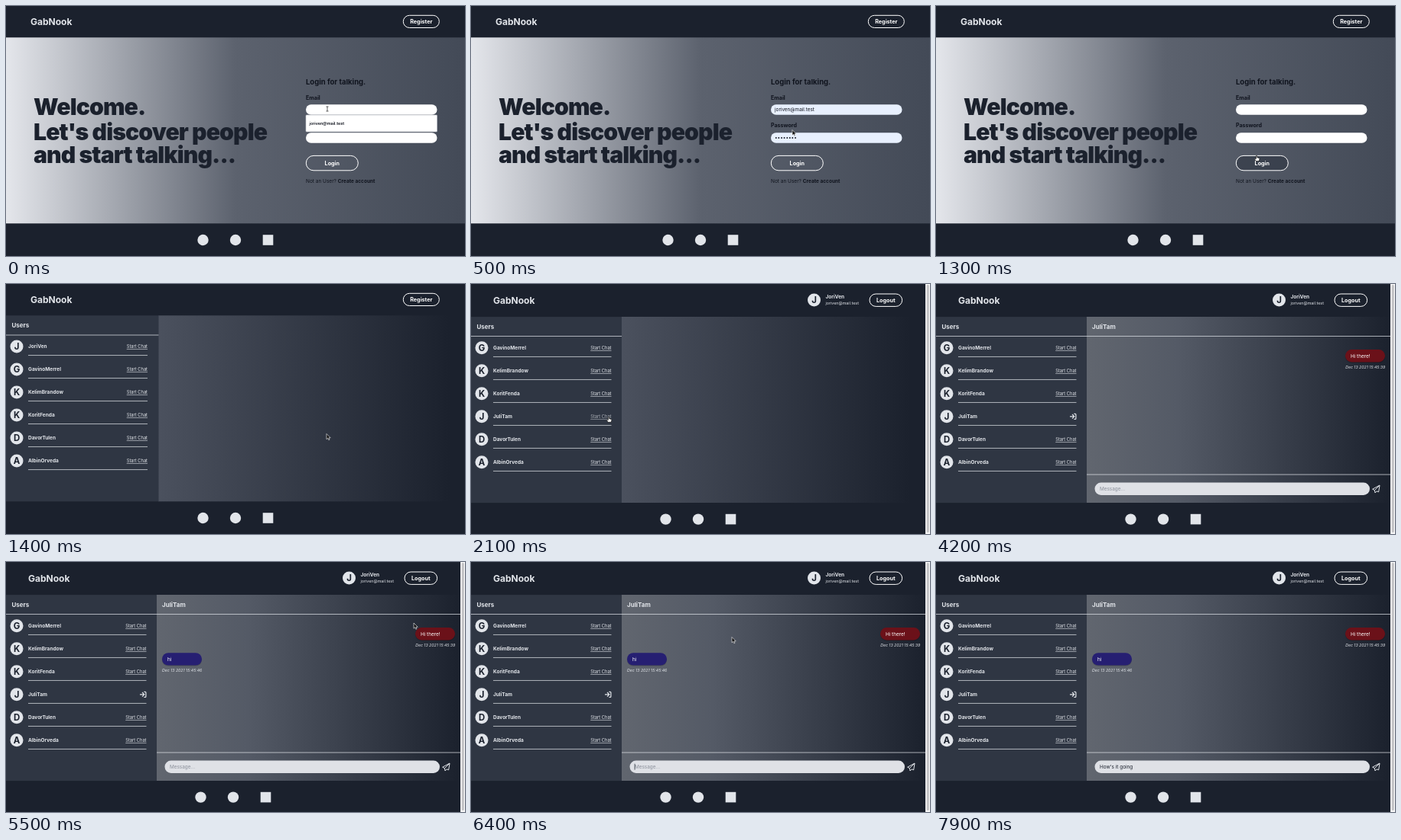
These frames come from a looping animation (600x328 px, 8 s). An HTML page:

```html
<!DOCTYPE html>
<html lang="en">
<head>
<meta charset="utf-8">
<title>Chat demo</title>
<style>
  html, body { margin: 0; width: 100%; height: 100%; overflow: hidden; background: #1b212d; }
  svg { display: block; width: 600px; height: 328px; }
  text { font-family: Inter, "Liberation Sans", sans-serif; white-space: pre; }
  .hero { letter-spacing: -.03em; }
</style>
</head>
<body>
<svg id="stage" viewBox="0 0 600 328" xmlns="http://www.w3.org/2000/svg"></svg>
<script>
const LOOP = 8000, STEP = 100;
const DARK = '#1b212d', INK = '#10141e', LIGHT = '#e2e5ea', PANEL = '#2f3643';
const ME = 'JoriVen', MAIL = 'joriven@mail.test', FRIEND = 'JuliTam';
const OTHERS = ['GavinoMerrel', 'KelimBrandow', 'KoritFenda'];
const LAST = ['DavorTulen', 'AlbinOrveda'];

// Markup helpers
const rect = (x, y, w, h, fill, more = '') =>
  `<rect x="${x}" y="${y}" width="${w}" height="${h}" fill="${fill}" ${more}/>`;
const text = (x, y, str, size, weight = 400, fill = LIGHT, more = '') =>
  `<text x="${x}" y="${y}" font-size="${size}" font-weight="${weight}" fill="${fill}" ${more}>${str}</text>`;
const line = (x1, x2, y) => rect(x1, y - 0.45, x2 - x1, 0.9, LIGHT, 'opacity=".8"');
const group = (id, body) => `<g id="${id}">${body}</g>`;
const END = 'text-anchor="end"', MID = 'text-anchor="middle"';

const pill = (x, y, w, h, fill, more = '') => rect(x, y, w, h, fill, `rx="${h / 2}" ${more}`);
const button = (x, y, w, h, label, fill) =>
  pill(x, y, w, h, fill, 'stroke="#fff"') +
  text(x + w / 2, y + h / 2 + 2.6, label, 7.2, 700, '#fff', MID);
const avatar = (x, y, name) =>
  `<circle cx="${x}" cy="${y}" r="8.5" fill="${LIGHT}"/>` +
  text(x, y + 4.1, name[0], 11.4, 700, DARK, MID);

const gradient = (id, stops) =>
  `<linearGradient id="${id}">${stops.map(([at, c]) =>
    `<stop offset="${at}" stop-color="${c}"/>`).join('')}</linearGradient>`;

const frame = (x, dy) =>
  rect(0, 0, 600, 328, DARK) + text(32 + x, 24.8 + dy / 2, 'GabNook', 12, 700) +
  `<g fill="${LIGHT}"><circle cx="${257.5 + x}" cy="${307 + dy * 0.8}" r="7.2"/>` +
  `<circle cx="${300 + x}" cy="${307 + dy * 0.8}" r="7.2"/></g>` +
  rect(335.7 + x, 300.2 + dy * 0.8, 13.6, 13.6, LIGHT);

const register = button(519.3, 12.3, 47, 16.2, 'Register', DARK);

const startChat = (x, y, more = '') =>
  text(x, y, 'Start Chat', 5.75, 400, LIGHT, `${END} text-decoration="underline" ${more}`);

function userList(names, width, right, dy) {
  const rows = names.map((name, i) => {
    const y = 82 + dy + i * 30;
    return avatar(14, y, name) + text(29, y + 2.3, name, 6.5, 700) +
      (name === FRIEND ? '' : startChat(right, y + 2.2)) + line(29, right, y + 11.6);
  }).join('');
  return rect(0, 41.3 + dy, width, 244, PANEL) + text(7.5, 57 + dy * 0.85, 'Users', 8, 700) +
    line(0, width, 67 + dy * 0.8) + rows;
}

const field = (id, y) => pill(392, y, 171.5, 13.5, '#fff', `id="${id}"`);
const hero = (y, str) => text(36, y, str, 30.2, 900, DARK, 'class="hero"');

const login =
  frame(0, 0) + register + rect(0, 41.3, 600, 244, 'url(#dawn)') +
  hero(143.4, 'Welcome.') + hero(176.4, "Let's discover people") + hero(206.4, 'and start talking...') +
  text(392, 103, 'Login for talking.', 9.5, 700, INK) +
  text(392, 122.5, 'Email', 7.1, 700, INK) + field('emailBox', 129.3) +
  text(392, 159.2, 'Password', 7.1, 700, INK) + field('passBox', 166.2) +
  group('filled', text(397, 138.3, MAIL, 6.4, 400, INK) + text(397, 175.4, '••••••••', 6.4, 400, INK)) +
  pill(392.3, 196.4, 68, 19.4, DARK, 'id="hover" opacity=".4"') +
  button(392.3, 196.4, 68, 19.4, 'Login', 'none') +
  text(392, 232, 'Not an User? <tspan font-weight="700">Create account</tspan>', 6.5, 400, INK) +
  group('suggest', rect(392, 143, 171.5, 22, '#fff', 'rx="1" stroke="#b9bcc4" stroke-width=".6"') +
    text(396.5, 156, MAIL, 5.4, 600, INK));

const lobby =
  frame(0, 0) + register + rect(199, 41.3, 401, 244, 'url(#dusk)') +
  userList([ME, ...OTHERS, ...LAST], 199.5, 185, 0);

const bubble = (x, y, label, fill) =>
  pill(x, y + 1, 52, 16.4, '#000', 'opacity=".22"') + pill(x, y, 52, 16.4, fill) +
  text(x + 7, y + 10.6, label, 6.4, 400, '#fff');
const stamp = (x, y, time, more = '') =>
  text(x, y, 'Dec 13 2021 ' + time, 5.2, 400, LIGHT, `font-style="italic" ${more}`);

const chat =
  rect(197, 43, 397, 244, 'url(#room)') + text(204, 58.6, FRIEND, 8, 700) +
  line(197, 594, 68.5) + line(197, 594, 250) +
  pill(207.5, 260.5, 359.5, 16.4, '#dfe1e6') +
  text(214, 271, '', 6.4, 400, DARK, 'id="draft"') +
  rect(213.7, 264.7, 0.7, 8, DARK, 'id="caret"') +
  `<path d="M580 264 570.6 269.2 573.4 270.6 574 274 576 271.8 578.6 272.8ZM580 264 573.4 270.6" fill="none" stroke="${LIGHT}" stroke-linejoin="round"/>` +
  group('sent', bubble(535, 86, 'Hi there!', '#6b1119') + stamp(587.3, 110.5, '15:45:39', END)) +
  group('reply', bubble(204, 119.2, 'hi', '#261f72') + stamp(204, 144, '15:45:46')) +
  `<path d="M175 173.8h5M178 171l2.8 2.8-2.8 2.8M180.4 170.3h1.6q.9 0 .9.9v5.2q0 .9-.9.9h-1.6" fill="none" stroke="${LIGHT}" stroke-width="1.2"/>`;

const home =
  frame(-3, 2) + avatar(448.5, 21, ME) + text(463.5, 19, ME, 6.5, 700) +
  text(463.5, 27, MAIL, 5.35) + button(521, 13, 42.6, 16.4, 'Logout', DARK) +
  rect(196, 43, 398, 244, 'url(#dusk)') +
  userList([...OTHERS, FRIEND, ...LAST], 197, 183.5, 1.8) +
  startChat(183.5, 176.1, 'id="invite"') + group('chat', chat) +
  rect(594, 0, 6, 328, '#f6f6f7') + rect(595.6, 1, 3.2, 325, '#c4c4c6', 'rx="1.6"');

const cursors =
  group('arrow', `<path d="M0 0V7.2L1.7 5.7 2.8 8.2 4 7.7 2.9 5.3H5.2Z" fill="#111" stroke="#fff" stroke-width=".6"/>`) +
  group('hand', `<path d="M-.7 0Q0-.8.7 0V2.2L3.3 2.9Q4 3.1 3.9 4L3.2 6.8H-.9L-2.8 4Q-2.4 3-.7 4Z" fill="#fff" stroke="#111" stroke-width=".7"/>`) +
  group('ibeam', `<path d="M-1.5-3H1.5M0-3V3M-1.5 3H1.5" fill="none" stroke="#333" stroke-width=".8"/>`);

const stage = document.getElementById('stage');
stage.innerHTML = '<defs>' +
  gradient('dawn', [[0, '#e4e6eb'], [0.5, '#5c626e'], [1, '#434a57']]) +
  gradient('dusk', [[0, '#4b515e'], [0.95, DARK], [1, DARK]]) +
  gradient('room', [[0, '#61666f'], [0.3, '#545a66'], [1, DARK]]) + '</defs>' +
  group('login', login) + group('lobby', lobby) + group('home', home) + group('cursor', cursors);

const el = id => document.getElementById(id);
const show = (id, on) => el(id).setAttribute('visibility', on ? 'inherit' : 'hidden');
const screen = (id, on) => { el(id).style.display = on ? '' : 'none'; };

// time, x, y, shape from that time on
const PATH = [
  [0, 420, 135, 'ibeam'], [200, 420, 153, 'arrow'], [400, 420, 156, 'arrow'],
  [800, 420, 198, 'hand'], [1400, 419, 196.5, 'arrow'], [1500, 419, 196.5, 'arrow'],
  [1800, 180, 174.5, 'hand'], [2200, 180, 174.5, 'arrow'],
  [2600, 330, 268, 'ibeam'], [2800, 330, 268, ''],
  [5500, 533, 80, 'arrow'], [5900, 360, 268, 'ibeam'], [6100, 358, 262, 'arrow'],
  [6400, 341, 98.5, 'arrow'], [6600, 341, 98.5, '']
];
const DRAFT = [
  [0, ''], [2800, 'H'], [2900, 'Hi'], [3000, 'Hi th'], [3100, 'Hi the'], [3200, 'Hi ther'],
  [3300, 'Hi there!'], [3500, ''], [6600, 'H'], [6700, 'Ho'], [6900, 'How'], [7000, "How'"],
  [7200, "How's"], [7300, "How's i"], [7400, "How's it"], [7500, "How's it g"],
  [7600, "How's it go"], [7700, "How's it goi"], [7800, "How's it goin"], [7900, "How's it going"]
];
const indexAt = (steps, t) => steps.findLastIndex(step => step[0] <= t);

function moveCursor(t) {
  const i = indexAt(PATH, t);
  const [t0, x0, y0, shape] = PATH[i];
  const [t1, x1, y1] = PATH[i + 1] || [LOOP, x0, y0];
  const k = (t - t0) / (t1 - t0), ease = k * k * (3 - 2 * k);
  el('cursor').setAttribute('transform', `translate(${x0 + (x1 - x0) * ease} ${y0 + (y1 - y0) * ease})`);
  for (const id of ['arrow', 'hand', 'ibeam']) show(id, id === shape);
}

function render(t) {
  screen('login', t < 1400);
  screen('lobby', t >= 1400 && t < 1600);
  screen('home', t >= 1600);

  const filled = t >= 300 && t < 1200;
  show('suggest', t < 300);
  show('filled', filled);
  show('hover', t >= 800);
  for (const id of ['emailBox', 'passBox']) el(id).setAttribute('fill', filled ? '#e8f0fe' : '#fff');

  show('invite', t < 2200);
  el('invite').setAttribute('opacity', t >= 2000 ? 0.7 : 1);
  screen('chat', t >= 2200);
  show('sent', t >= 3500);
  show('reply', t >= 5500);

  const draft = DRAFT[indexAt(DRAFT, t)][1];
  el('draft').textContent = draft || 'Message...';
  el('draft').setAttribute('fill', draft ? DARK : '#8b909b');
  show('caret', (t >= 2600 && t < 2800) || (t >= 5900 && t < 6600));
  moveCursor(t);
}

const start = performance.now();
function tick() {
  const t = (performance.now() - start) % LOOP;
  render(Math.floor(t / STEP) * STEP);
  requestAnimationFrame(tick);
}
tick();
</script>
</body>
</html>
```
